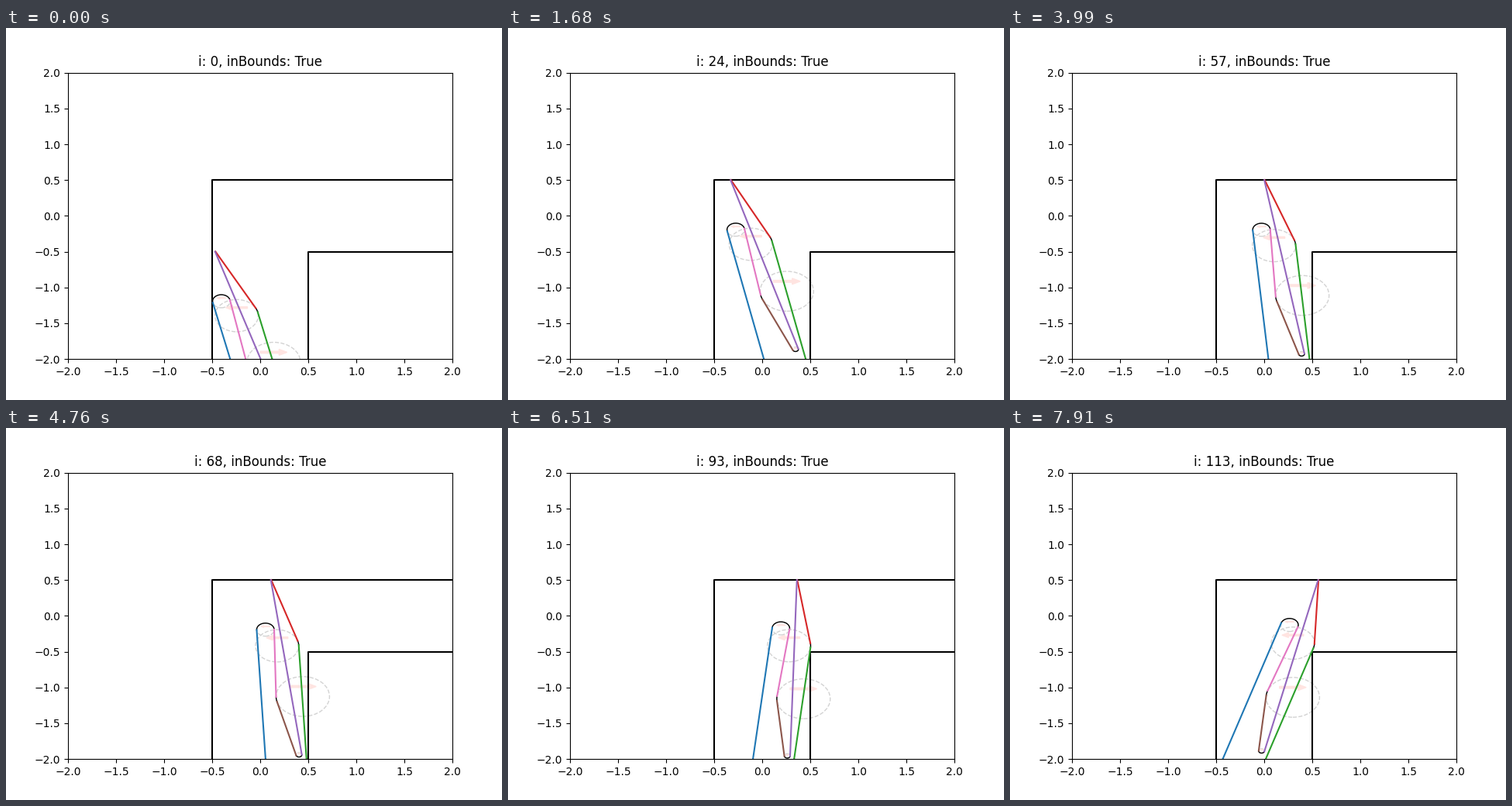
A matplotlib script that plays this animation: 640x480 px, repeating every 7.98 s.

```python
import numpy as np
import matplotlib.pyplot as plt
from matplotlib.animation import FuncAnimation
from matplotlib.patches import Circle, FancyArrow

FRAMES, INTERVAL = 114, 70
LIFT = 10                       # steps spent moving straight up
START_X, STEP_X = -0.467, 0.01
START_ANGLE = np.radians(17.53)

# Rounded corners in body coordinates (tip at the origin): x, y, radius.
# A negative radius is a clockwise turn.
CORNERS = [
    (-0.312, -2.823, 0.1),
    (-0.0855, -2.8226, 0.1),
    (-0.0577, -0.9187, 0.225),
    (0.0, 0.0, 0.002),
    (-0.0318, -2.458, -0.03),
    (0.1146, -1.655, -0.278),
    (-0.1488, -0.679, 0.091),
]
COLORS = ["C1", "C2", "C3", "C4", "C5", "C6", "C0"]


def heading(a, b):
    """Direction of the tangent leading from corner a to corner b."""
    dx, dy = b[0] - a[0], b[1] - a[1]
    return np.arctan2(dy, dx) + np.arcsin((a[2] - b[2]) / np.hypot(dx, dy))


def touch(c, psi):
    """Point of corner c where the outline runs in direction psi."""
    return np.array([c[0] + c[2] * np.sin(psi), c[1] - c[2] * np.cos(psi)])


def outline():
    n = len(CORNERS)
    psi = [heading(CORNERS[k], CORNERS[(k + 1) % n]) for k in range(n)]
    sides, arcs = [], []
    for k, c in enumerate(CORNERS):
        nxt = CORNERS[(k + 1) % n]
        sides.append(np.array([touch(c, psi[k]), touch(nxt, psi[k])]).T)
        turn = np.sign(c[2])
        sweep = turn * ((turn * (psi[k] - psi[k - 1])) % (2 * np.pi))
        arcs.append(touch(c, psi[k - 1] + np.linspace(0, sweep, 40)))
    return sides, arcs


def pose(i):
    """Tip position and rotation at step i."""
    if i <= LIFT:
        return START_X, -0.5 + i / LIFT, START_ANGLE
    x = START_X + STEP_X * (i - LIFT)
    # heel sliding along the inner wall
    heel = np.arcsin((0.4834 - x) / 2.83)
    # long side leaning on the inner corner
    dx = 0.5 - x
    lean = np.arccos(0.245 / np.hypot(dx, 1)) - np.arctan2(1, dx) + np.radians(4.6)
    return x, 0.5, min(START_ANGLE, heel, lean)


SIDES, ARCS = outline()
CENTERS = np.array([c[:2] for c in CORNERS]).T

fig, ax = plt.subplots(figsize=(6.4, 4.8), dpi=100)
ax.set_xlim(-2, 2)
ax.set_ylim(-2, 2)
for s in (-1, 1):
    ax.plot([s * 0.5, s * 0.5, 2], [-2, -s * 0.5, -s * 0.5], "k")
title = ax.set_title("")

rings, arrows = [], []
for _, _, r in CORNERS:
    size = abs(r)
    rings.append(ax.add_patch(Circle((0, 0), size, fill=False, ec="lightgray", ls="--")))
    arrows.append(ax.add_patch(FancyArrow(
        0, 0, -r, 0, width=0.1 * size, head_width=0.3 * size,
        head_length=0.3 * size, length_includes_head=True, color="mistyrose")))
arc_lines = [ax.plot([], [], "k", lw=1, zorder=1.5)[0] for _ in ARCS]
side_lines = [ax.plot([], [], color=c)[0] for c in COLORS]


def draw(i):
    x, y, angle = pose(i)
    c, s = np.cos(angle), np.sin(angle)

    def place(p):
        return np.array([[c, -s], [s, c]]) @ p + np.array([[x], [y]])

    for line, pts in zip(side_lines + arc_lines, SIDES + ARCS):
        line.set_data(*place(pts))
    for ring, arrow, (cx, cy), (_, _, r) in zip(rings, arrows, place(CENTERS).T, CORNERS):
        ring.center = cx, cy
        arrow.set_data(x=cx + r / 2, y=cy + abs(r) / 2)
    title.set_text(f"i: {i}, inBounds: True")
    return [title, *rings, *arrows, *arc_lines, *side_lines]


anim = FuncAnimation(fig, draw, frames=FRAMES, interval=INTERVAL,
                     repeat=True, repeat_delay=0)
plt.show()
```
